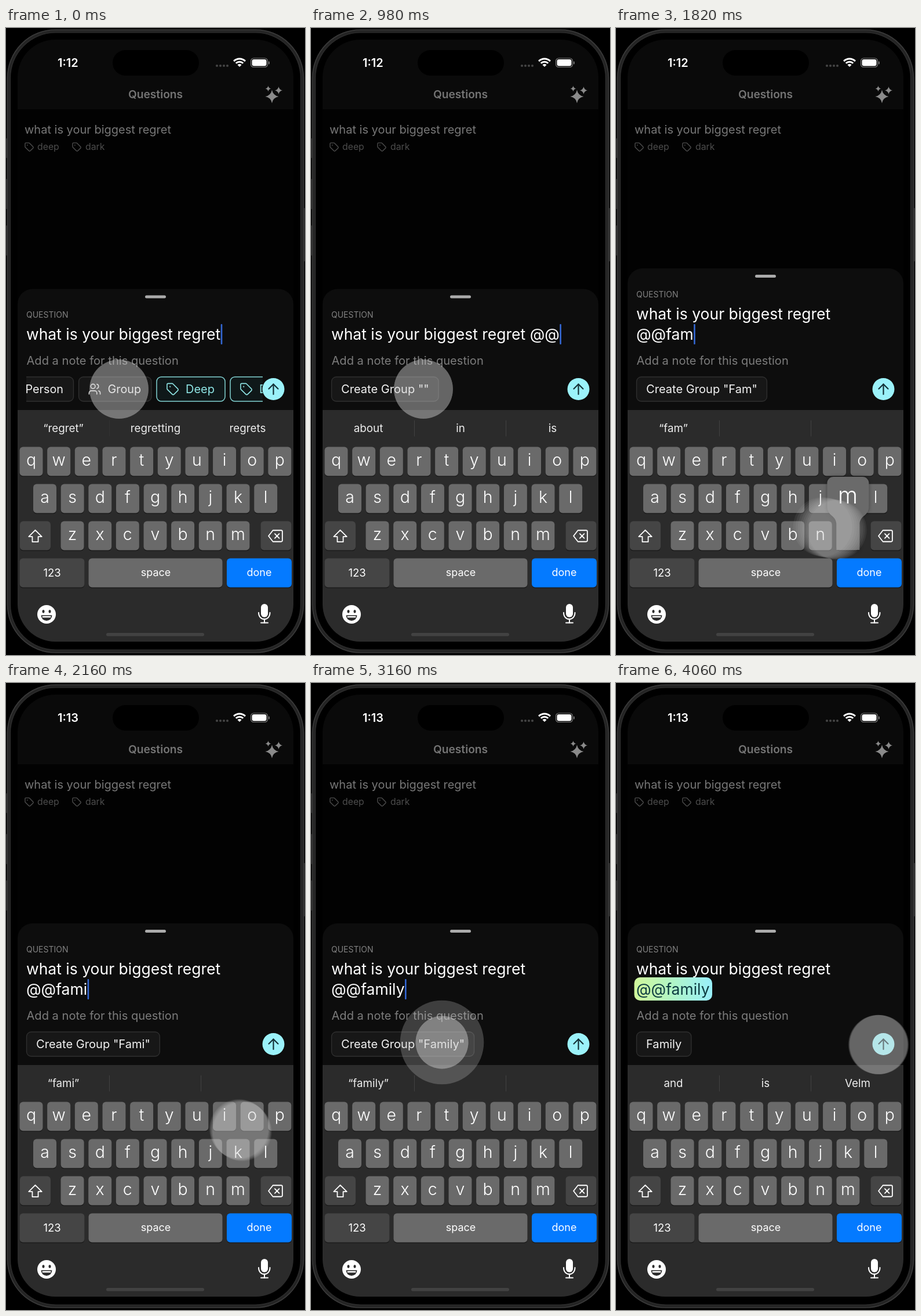
These frames come from a looping animation (516 px wide and 1080 px high, 4.08 s). An HTML page with a canvas:

```html
<!DOCTYPE html>
<html lang="en">
<head>
<meta charset="utf-8">
<title>Questions</title>
<style>
html, body { margin: 0; width: 100%; height: 100%; overflow: hidden; background: #000; }
canvas { display: block; }
</style>
</head>
<body>
<canvas width="516" height="1080"></canvas>
<script>
const ctx = document.querySelector('canvas').getContext('2d');
const LOOP = 4080;
const FONT = 'Inter, "Open Sans", sans-serif';
const QUESTION = 'what is your biggest regret';
const WORD = 'family';
const TYPED_AT = [1340, 1530, 1800, 2030, 2240, 2430];
const GROUP_CLICK = 300, GROUP_DONE = 430;
const CREATE_CLICK = 3090, CREATE_DONE = 3290;
const CLOCK_TICK = 1850;

// time, x, y of the pointer; it eases from one stop to the next
const STOPS = [
  [0, 195, 622], [1060, 194, 622], [1360, 208, 790], [1456, 207, 791],
  [1656, 78, 800], [1690, 78, 800], [1850, 398, 868], [1880, 398, 868],
  [2040, 378, 748], [2060, 378, 748], [2300, 448, 806], [2340, 448, 806],
  [2540, 281, 745], [2680, 281, 745], [3030, 226, 619], [3460, 226, 619],
  [4135, 461, 623]
];

const TAG = new Path2D('M12.6 2.6A2 2 0 0 0 11.2 2H4a2 2 0 0 0-2 2v7.2a2 2 0 0 0 .6 1.4l8.7 8.7a2.4 2.4 0 0 0 3.4 0l6.6-6.6a2.4 2.4 0 0 0 0-3.4zM7.9 7.5a.4.4 0 1 1-.8 0a.4.4 0 0 1 .8 0z');
const USERS = new Path2D('M16 21v-2a4 4 0 0 0-4-4H6a4 4 0 0 0-4 4v2M22 21v-2a4 4 0 0 0-3-3.87M16 3.13a4 4 0 0 1 0 7.75M13 7a4 4 0 1 1-8 0a4 4 0 0 1 8 0z');
const SHIFT = new Path2D('M12 2.5L22 12.5H16.5V20.5H7.5V12.5H2z');
const DELETE = new Path2D('M8 3H21a2 2 0 0 1 2 2V19a2 2 0 0 1-2 2H8L1 12zM11 8.5l7 7M18 8.5l-7 7');

const clamp = v => Math.min(1, Math.max(0, v));
const smooth = v => (v = clamp(v), v * v * (3 - 2 * v));

function box(x, y, w, h, r, fill, stroke, line = 1.3) {
  ctx.beginPath();
  ctx.roundRect(x, y, w, h, r);
  if (fill) { ctx.fillStyle = fill; ctx.fill(); }
  if (stroke) { ctx.strokeStyle = stroke; ctx.lineWidth = line; ctx.stroke(); }
}

function disc(x, y, r, fill) {
  ctx.beginPath();
  ctx.arc(x, y, r, 0, 7);
  ctx.fillStyle = fill;
  ctx.fill();
}

function text(str, x, y, size, color, align = 'left', weight = 400) {
  ctx.font = `${weight} ${size}px ${FONT}`;
  ctx.textAlign = align;
  ctx.fillStyle = color;
  ctx.fillText(str, x, y);
  return ctx.measureText(str).width;
}

function line(points, color, width) {
  ctx.beginPath();
  points.forEach(([x, y]) => ctx.lineTo(x, y));
  ctx.strokeStyle = color;
  ctx.lineWidth = width;
  ctx.stroke();
}

function icon(path, cx, cy, size, color, width = 1.8) {
  ctx.save();
  ctx.translate(cx - size / 2, cy - size / 2);
  ctx.scale(size / 24, size / 24);
  ctx.strokeStyle = color;
  ctx.lineWidth = width * 24 / size;
  ctx.stroke(path);
  ctx.restore();
}

function star(x, y, r, color) {
  ctx.beginPath();
  for (let i = 0; i <= 4; i++) {
    const a = i * Math.PI / 2, px = x + r * Math.sin(a), py = y - r * Math.cos(a);
    const m = a - Math.PI / 4;
    if (i) ctx.quadraticCurveTo(x + .22 * r * Math.sin(m), y - .22 * r * Math.cos(m), px, py);
    else ctx.moveTo(px, py);
  }
  ctx.fillStyle = color;
  ctx.fill();
}

function phone() {
  ctx.fillStyle = '#000';
  ctx.fillRect(0, 0, 516, 1080);
  for (const [y, h] of [[190, 34], [260, 52], [340, 52]]) box(0, y, 3, h, 1, '#252525');
  box(513, 310, 3, 92, 1, '#252525');
  box(2.5, 3, 511, 1073, 83, '#242424', '#3b3b3b', 1.6);
  box(7.5, 8, 501, 1063, 78, '#000', '#2f2f2f', 1.2);
}

function status(t) {
  ctx.fillStyle = '#0a0a0a';
  ctx.fillRect(20, 20, 476, 120);
  ctx.fillStyle = '#020202';
  ctx.fillRect(20, 140, 476, 520);
  box(184, 38, 149, 44, 22, '#000');
  text(t < CLOCK_TICK ? '1:12' : '1:13', 89, 67, 20, '#fff', 'left', 600);
  for (let i = 0; i < 4; i++) disc(364 + i * 6, 65, 2.1, '#444');

  ctx.lineCap = 'butt';
  for (const r of [14, 8.8]) {
    ctx.beginPath();
    ctx.arc(403, 67, r, -Math.PI * .75, -Math.PI * .25);
    ctx.strokeStyle = '#fff';
    ctx.lineWidth = 3;
    ctx.stroke();
  }
  ctx.beginPath();
  ctx.moveTo(403, 67);
  ctx.arc(403, 67, 5, -Math.PI * .75, -Math.PI * .25);
  ctx.fillStyle = '#fff';
  ctx.fill();
  ctx.lineCap = 'round';

  box(422.5, 52, 29, 15.5, 5, null, '#777', 1.2);
  box(424.5, 54, 25, 11.5, 3.4, '#fff');
  box(453, 57.5, 1.8, 5, 1, '#777');
  text('Questions', 258, 121, 19.2, '#747474', 'center', 600);
  star(459, 118, 11.5, '#8a8a8a');
  star(470.5, 107.5, 6.5, '#8a8a8a');
  star(452.5, 104.5, 5, '#8a8a8a');
  text(QUESTION, 32, 182, 20, '#777');
  icon(TAG, 40, 205, 17, '#4c4c4c', 1.4);
  text('deep', 54, 210, 15.8, '#4c4c4c');
  icon(TAG, 122, 205, 17, '#4c4c4c', 1.4);
  text('dark', 137, 210, 15.8, '#4c4c4c');
}

function chip(label) {
  ctx.font = `400 20.1px ${FONT}`;
  box(35.5, 601, ctx.measureText(label).width + 33, 42, 8, '#171717', '#303030');
  text(label, 52, 629, 20.1, '#f2f2f2');
}

function filterChips() {
  ctx.save();
  ctx.beginPath();
  ctx.rect(35, 598, 408, 48);
  ctx.clip();
  box(-20, 601, 136.5, 42, 8, '#171717', '#303030');
  text('Person', 33.5, 629, 19.8, '#f2f2f2');
  box(125.5, 601, 125.5, 42, 8, '#171717', '#303030');
  icon(USERS, 153, 622, 23, '#ddd', 1.6);
  text('Group', 175.5, 629, 19.8, '#f2f2f2');
  for (const [x, label] of [[260, 'Deep'], [387, 'Dark']]) {
    box(x, 601, 118, 42, 8, '#0f1819', '#82d3d3', 1.5);
    icon(TAG, x + 27.5, 622, 23, '#8fe6e6', 1.6);
    text(label, x + 50, 629, 20, '#8fe6e6');
  }
  ctx.restore();
}

function sheet(t, count) {
  const wrapped = count > 2, tagged = t >= CREATE_DONE;
  const lift = wrapped ? 35.5 : 0;
  const top = 449.5 - lift;
  box(20, top, 476, 660 - top, [26, 26, 0, 0], '#0d0d0d');
  box(240, top + 11, 36, 5, 2.5, '#ababab');
  text('QUESTION', 35, 499 - lift, 14, '#828282');

  // the second letter's caret shows a moment before the letter
  const lagging = count === 2 && t < TYPED_AT[1] + 30;
  const shown = WORD.slice(0, lagging ? 1 : count);
  const mention = t < GROUP_DONE ? '' : '@@' + WORD.slice(0, count);
  const size = 26.5;
  let caret = 35;
  if (wrapped) {
    text(QUESTION, 35, 537 - lift, size, '#fff');
    if (tagged) {
      const w = ctx.measureText(mention).width + 8;
      const g = ctx.createLinearGradient(32, 0, 32 + w, 0);
      g.addColorStop(0, '#d0f79a');
      g.addColorStop(.5, '#b0f5c8');
      g.addColorStop(1, '#98effb');
      box(31.5, 507, w, 40, 10, g);
      caret += 8;
    }
    caret += text(mention, 35, 537, size, tagged ? '#0d3b40' : '#fff');
  } else {
    const head = QUESTION + (mention && ' ');
    text(head + (mention && '@@' + shown), 35, 537, size, '#fff');
    caret += ctx.measureText(head + mention).width;
  }
  if (t < 3800) box(caret + .5, 510, 2.6, 35, 1, '#3468d4');

  text('Add a note for this question', 35.5, 580, 20.1, '#7c7c7c');
  if (t < GROUP_DONE) filterChips();
  else {
    const name = shown && shown[0].toUpperCase() + shown.slice(1);
    ctx.globalAlpha = clamp((t - (tagged ? CREATE_DONE : GROUP_DONE)) / 120);
    chip(tagged ? name : `Create Group "${name}"`);
    ctx.globalAlpha = 1;
  }
  disc(461.5, 622, 19, '#9bf2fa');
  line([[461.5, 631], [461.5, 613.5]], '#153238', 2.2);
  line([[453.5, 621.5], [461.5, 613.5], [469.5, 621.5]], '#153238', 2.2);
}

function key(x, y, w, fill = '#6a6a6a') {
  box(x, y + 1, w, 50, 6, '#1b1b1b');
  box(x, y - .5, w, 50, 6, fill);
}

const ROWS = [['qwertyuiop', 23.5, 722], ['asdfghjkl', 47, 786], ['zxcvbnm', 94.5, 850]];
const PITCH = 47.65;

function popup(letter) {
  const [letters, left, y] = ROWS.find(row => row[0].includes(letter));
  const x = left + letters.indexOf(letter) * PITCH + 20, top = y - 77;
  ctx.save();
  ctx.shadowColor = 'rgba(0,0,0,.4)';
  ctx.shadowBlur = 6;
  ctx.beginPath();
  ctx.moveTo(x - 20, y + 49);
  ctx.lineTo(x - 20, y + 6);
  ctx.bezierCurveTo(x - 20, y - 12, x - 36, y - 8, x - 36, y - 26);
  ctx.arcTo(x - 36, top, x, top, 11);
  ctx.arcTo(x + 36, top, x + 36, y, 11);
  ctx.lineTo(x + 36, y - 26);
  ctx.bezierCurveTo(x + 36, y - 8, x + 20, y - 12, x + 20, y + 6);
  ctx.lineTo(x + 20, y + 49);
  ctx.closePath();
  ctx.fillStyle = '#6a6a6a';
  ctx.fill();
  ctx.restore();
  text(letter, x - .5, y - 31, 39, '#fff', 'center', 300);
}

function suggestions(t, count) {
  const first = t < GROUP_DONE;
  let words = ['about', 'in', 'is'];
  if (first) words = ['“regret”', 'regretting', 'regrets'];
  else if (t >= CREATE_DONE) words = ['and', 'is', 'Velm'];
  else if (count) {
    const shown = t < TYPED_AT[1] + 30 ? 1 : count;
    words = [`“${WORD.slice(0, shown)}”`];
  }
  words.forEach((word, i) => text(word, 99 + i * 159, 696, 18.8, '#eee', 'center'));
  line([[178.5, 676], [178.5, 703]], first ? '#323232' : '#414141', 1);
  if (!first) line([[336.5, 676], [336.5, 703]], '#414141', 1);
}

function keyboard(t, count) {
  ctx.fillStyle = '#2b2b2b';
  ctx.fillRect(20, 658, 476, 400);
  suggestions(t, count);
  for (const [letters, left, y] of ROWS) {
    [...letters].forEach((letter, i) => {
      const x = left + i * PITCH;
      key(x, y, 40);
      text(letter, x + 20, y + 32, 28.5, '#fff', 'center', 300);
    });
  }
  key(24, 850, 53, '#454545');
  icon(SHIFT, 50.5, 875.5, 27, '#fff', 1.8);
  key(439.5, 850, 53, '#454545');
  icon(DELETE, 465, 875, 26, '#fff', 1.8);
  key(23.5, 914, 112, '#454545');
  text('123', 79.5, 945, 18.5, '#fff', 'center');
  key(142.5, 914, 231);
  text('space', 258.5, 944, 18, '#fff', 'center');
  key(381, 914, 112, '#047aff');
  text('done', 437, 944, 18, '#fff', 'center');

  disc(70, 1010, 16, '#fff');
  for (const x of [64.5, 75.5]) {
    ctx.beginPath();
    ctx.ellipse(x, 1005, 2, 2.8, 0, 0, 7);
    ctx.fillStyle = '#2b2b2b';
    ctx.fill();
  }
  ctx.beginPath();
  ctx.arc(70, 1011.5, 9.5, 0, Math.PI);
  ctx.closePath();
  ctx.fill();
  box(62.5, 1013, 15, 2.6, 1, '#fff');

  box(440, 992, 12, 23, 6, '#fff');
  ctx.beginPath();
  ctx.moveTo(436, 1007);
  ctx.bezierCurveTo(436, 1022, 455.5, 1022, 455.5, 1007);
  ctx.strokeStyle = '#fff';
  ctx.lineWidth = 2;
  ctx.stroke();
  line([[446, 1018.5], [446, 1024.5]], '#fff', 2);
  line([[440, 1024.5], [452, 1024.5]], '#fff', 2);
  box(173, 1042, 169, 5.5, 2.7, '#424242');

  TYPED_AT.forEach((at, i) => {
    if (t >= at - 50 && t < at + 45) popup(WORD[i]);
  });
}

function pointerAt(t) {
  let i = 0;
  while (i < STOPS.length - 2 && t >= STOPS[i + 1][0]) i++;
  const [t0, x0, y0] = STOPS[i], [t1, x1, y1] = STOPS[i + 1];
  const s = smooth((t - t0) / (t1 - t0));
  return [x0 + (x1 - x0) * s, y0 + (y1 - y0) * s];
}

function pointer(t) {
  const [x, y] = pointerAt(t);
  let radius = 51;
  for (const click of [GROUP_CLICK, CREATE_CLICK]) {
    const p = (t - click) / 300;
    if (p < 0 || p > 1) continue;
    radius -= 8 * Math.sin(Math.PI * p);
    disc(x, y, 51 + 51 * (1 - (1 - p) ** 2), `rgba(205,205,205,${.33 * (1 - p)})`);
  }
  // several faint discs along the path give motion blur
  const copies = 8, alpha = 1 - .56 ** (1 / copies);
  for (let i = 0; i < copies; i++) {
    const [px, py] = pointerAt(t + (i / (copies - 1) - .5) * 14);
    disc(px, py, radius, `rgba(205,205,205,${alpha})`);
  }
}

function draw(now) {
  const t = now % LOOP;
  const count = TYPED_AT.filter(at => t >= at).length;
  ctx.lineCap = ctx.lineJoin = 'round';
  phone();
  ctx.save();
  ctx.beginPath();
  ctx.roundRect(20, 20, 476, 1037, 65);
  ctx.clip();
  status(t);
  sheet(t, count);
  keyboard(t, count);
  ctx.restore();
  pointer(t);
  requestAnimationFrame(draw);
}
draw(0);
</script>
</body>
</html>
```
